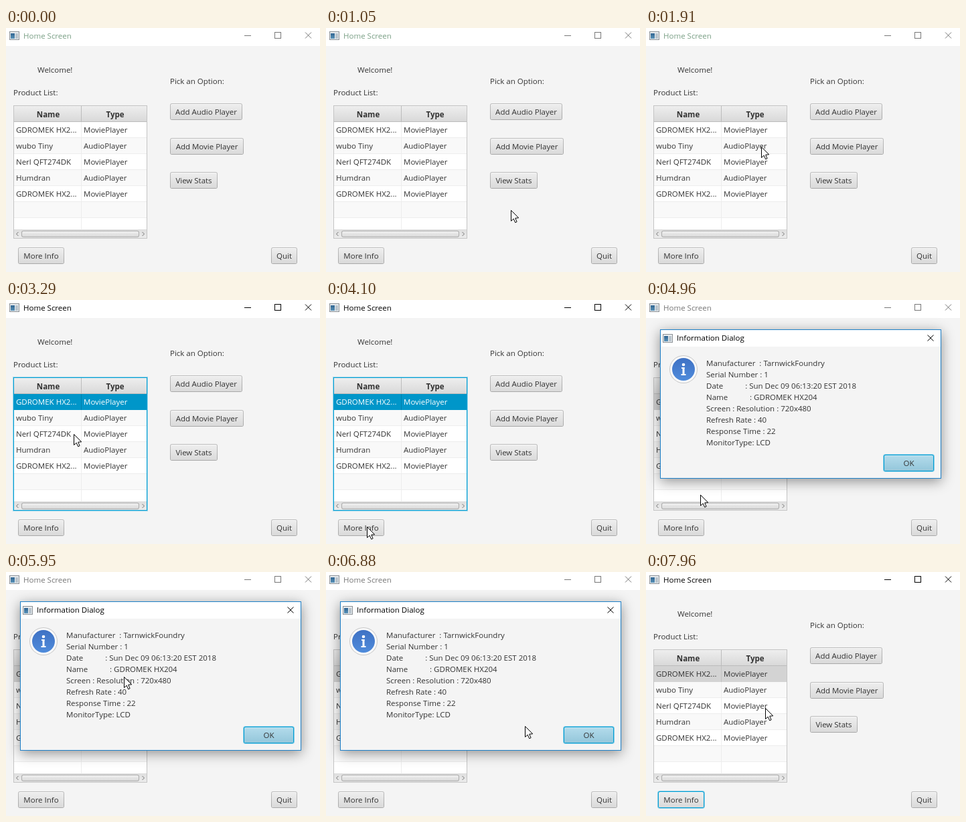
These frames come from a looping animation (469x366 px, 8 s). An HTML page with a canvas:

```html
<!DOCTYPE html>
<html lang="en">
<head>
<meta charset="utf-8">
<title>Home Screen</title>
<style>
html, body { margin: 0; width: 100%; height: 100%; overflow: hidden; background: #f4f4f4; }
canvas { display: block; width: 469px; height: 366px; }
</style>
</head>
<body>
<canvas id="stage" width="469" height="366"></canvas>
<script>
const W = 469, H = 366, LOOP = 8000;
const FAMILY = '"Open Sans", "Noto Sans", sans-serif';
const INK = '#333';
const ACCENT = '#039ed3';

// Moments at which the window state changes, in ms
const ACTIVATE = 2330, SELECT = 2410, PRESS = 4190, OPEN = 4305, CLOSE = 7200;
const FADE = 200;

const ROWS = [
  ['GDROMEK HX2...', 'MoviePlayer'],
  ['wubo Tiny', 'AudioPlayer'],
  ['Nerl QFT274DK', 'MoviePlayer'],
  ['Humdran', 'AudioPlayer'],
  ['GDROMEK HX2...', 'MoviePlayer']
];

const INFO = [
  'Manufacturer  : TarnwickFoundry',
  'Serial Number : 1',
  'Date           : Sun Dec 09 06:13:20 EST 2018',
  'Name           : GDROMEK HX204',
  'Screen : Resolution : 720x480',
  'Refresh Rate : 40',
  'Response Time : 22',
  'MonitorType: LCD'
];

// Pointer path: time, x, y
const PATH = [
  [440, 369, 362], [840, 318, 300], [1240, 241, 250], [1600, 205, 207],
  [1910, 172, 178], [2050, 145, 170], [2150, 124, 153], [2810, 124, 153],
  [3290, 101, 201], [3570, 88, 244], [3680, 85, 258], [4120, 61, 340],
  [4740, 61, 340], [4960, 81, 292], [5430, 172, 137], [5570, 172, 137],
  [5710, 172, 152], [5850, 173, 153], [6650, 256, 225], [6880, 297, 231],
  [7130, 366, 244], [7260, 366, 244], [7490, 301, 239], [7960, 178, 204]
];

const ctx = document.getElementById('stage').getContext('2d');

function text(g, str, x, y, color = INK, weight = 400, align = 'left') {
  g.font = `${weight} 11.5px ${FAMILY}`;
  g.textAlign = align;
  g.fillStyle = color;
  g.fillText(str, x, y);
}

function rect(g, x, y, w, h, fill) {
  g.fillStyle = fill;
  g.fillRect(x, y, w, h);
}

function frame(g, x, y, w, h, color) {
  g.strokeStyle = color;
  g.lineWidth = 1;
  g.strokeRect(x + 0.5, y + 0.5, w - 1, h - 1);
}

function shade(g, y, h, top, bottom) {
  const fill = g.createLinearGradient(0, y, 0, y + h);
  fill.addColorStop(0, top);
  fill.addColorStop(1, bottom);
  return fill;
}

function roundRect(g, x, y, w, h, r, fill) {
  g.beginPath();
  g.roundRect(x, y, w, h, r);
  g.fillStyle = fill;
  g.fill();
}

function lines(g, color, ...points) {
  g.beginPath();
  for (const [x1, y1, x2, y2] of points) {
    g.moveTo(x1, y1);
    g.lineTo(x2, y2);
  }
  g.strokeStyle = color;
  g.lineWidth = 1;
  g.stroke();
}

function cross(g, x, y, size, color) {
  lines(g, color, [x, y, x + size, y + size], [x + size, y, x, y + size]);
}

function button(g, label, x, y, w, focused, isDefault) {
  const h = 25;
  if (focused) roundRect(g, x - 1, y - 1, w + 2, h + 2, 4, '#8fd0e8');
  roundRect(g, x, y, w, h, 3, focused ? ACCENT : shade(g, y, h, '#bdbdbd', '#a8a8a8'));
  roundRect(g, x + 1, y + 1, w - 2, h - 2, 2, isDefault ? '#c4e6f3' : '#f8f8f8');
  const body = isDefault ? ['#b4dcec', '#93c6da'] : ['#efefef', '#d9d9d9'];
  roundRect(g, x + 1, y + 2, w - 2, h - 3, 2, shade(g, y, h, ...body));
  text(g, label, x + w / 2, y + 17, INK, 400, 'center');
}

function appIcon(g, x, y) {
  rect(g, x, y, 15, 13, '#8a8f94');
  rect(g, x + 1, y + 1, 13, 11, '#e9edf0');
  rect(g, x + 2, y + 3, 6, 8, shade(g, y + 3, 8, '#2f6390', '#5b93b8'));
  rect(g, x + 9, y + 3, 4, 8, '#b9c4cc');
}

function titleBar(active, dull) {
  const ink = active ? '#000' : dull;
  const mark = active ? '#000' : '#777';
  rect(ctx, 0, 0, W, 27, '#fff');
  appIcon(ctx, 5, 5);
  text(ctx, 'Home Screen', 26, 16, ink);
  lines(ctx, mark, [356, 11.5, 366, 11.5]);
  frame(ctx, 401, 6, 10, 10, mark);
  cross(ctx, 447, 6.5, 9, mark);
}

function scrollBar() {
  rect(ctx, 12, 302, 198, 13, shade(ctx, 302, 13, '#dedede', '#ececec'));
  roundRect(ctx, 23, 304, 176, 10, 3, '#ababab');
  roundRect(ctx, 24, 305, 174, 8, 2, shade(ctx, 305, 8, '#f0f0f0', '#d9d9d9'));
  lines(ctx, '#777',
    [18.5, 306, 15.5, 309], [15.5, 309, 18.5, 312],
    [203.5, 306, 206.5, 309], [206.5, 309, 203.5, 312]);
}

function table(selection, focused) {
  rect(ctx, 11, 116, 200, 200, '#fff');
  rect(ctx, 12, 117, 198, 24, shade(ctx, 117, 24, '#eeeeee', '#d8d8d8'));
  rect(ctx, 12, 140, 198, 1, '#bcbcbc');
  rect(ctx, 112, 117, 1, 24, '#bcbcbc');
  text(ctx, 'Name', 63, 134, INK, 700, 'center');
  text(ctx, 'Type', 163, 134, INK, 700, 'center');

  for (let i = 0; i < 7; i++) {
    const y = 141 + i * 24;
    const picked = i === 0 && selection;
    rect(ctx, 12, y, 198, Math.min(24, 302 - y), picked || (i % 2 ? '#f9f9f9' : '#fff'));
    rect(ctx, 12, y + 23, 198, 1, picked || '#ededed');
    rect(ctx, 112, y, 1, Math.min(24, 302 - y), picked ? (focused ? '#0080ad' : '#c2c2c2') : '#ededed');
    if (!ROWS[i]) continue;
    const ink = picked && focused ? '#fff' : INK;
    text(ctx, ROWS[i][0], 15, y + 16, ink);
    text(ctx, ROWS[i][1], 116, y + 16, ink);
  }
  scrollBar();
  frame(ctx, 11, 116, 200, 200, focused ? ACCENT : '#c4c4c4');
  if (focused) frame(ctx, 10, 115, 202, 202, '#9bd6ea');
}

function infoIcon(g, x, y) {
  const disc = (r, fill) => {
    g.beginPath();
    g.arc(x, y, r, 0, Math.PI * 2);
    g.fillStyle = fill;
    g.fill();
  };
  disc(21, '#c9c9c9');
  disc(20, '#fafafa');
  disc(17, shade(g, y - 17, 34, '#3f72c4', '#4f8bdb'));
  g.beginPath();
  g.arc(x, y - 7, 2.3, 0, Math.PI * 2);
  g.fillStyle = '#fff';
  g.fill();
  rect(g, x - 3, y - 3, 4.5, 2, '#fff');
  rect(g, x - 1.5, y - 3, 3, 11, '#fff');
  rect(g, x - 3.5, y + 7, 7, 2, '#fff');
}

// The dialog is painted once so that it can fade as a whole
function paintDialog() {
  const layer = document.createElement('canvas');
  layer.width = W;
  layer.height = H;
  const g = layer.getContext('2d');
  g.shadowColor = 'rgba(0,0,0,.42)';
  g.shadowBlur = 18;
  g.shadowOffsetY = 4;
  rect(g, 21, 44, 420, 224, '#f4f4f4');
  g.shadowColor = 'transparent';
  rect(g, 22, 45, 418, 25, '#fff');
  frame(g, 21, 44, 420, 224, '#1e80c8');
  appIcon(g, 25, 51);
  text(g, 'Information Dialog', 46, 61, '#000');
  cross(g, 420.5, 52.5, 9, '#000');
  infoIcon(g, 56, 104);
  INFO.forEach((line, i) => text(g, line, 90, 99 + i * 17));
  button(g, 'OK', 355, 232, 75, true, true);
  return layer;
}

const dialog = paintDialog();

function drawDialog(t) {
  if (t < OPEN || t > CLOSE + FADE) return;
  const p = t < CLOSE ? Math.min(1, (t - OPEN) / FADE) : 1 - (t - CLOSE) / FADE;
  const show = 1 - (1 - p) ** 2;
  const scale = 0.95 + 0.05 * show;
  ctx.save();
  ctx.globalAlpha = show;
  ctx.translate(231, 156);
  ctx.scale(scale, scale);
  ctx.drawImage(dialog, -231, -156);
  ctx.restore();
}

// Monotone cubic through the path, so that rests stay at rest
function slope(i, axis) {
  const a = PATH[i - 1], b = PATH[i], c = PATH[i + 1];
  if (!a || !c) {
    const [p, q] = a ? [a, b] : [b, c];
    return (q[axis] - p[axis]) / (q[0] - p[0]);
  }
  const before = (b[axis] - a[axis]) / (b[0] - a[0]);
  const after = (c[axis] - b[axis]) / (c[0] - b[0]);
  return before * after > 0 ? 2 * before * after / (before + after) : 0;
}

function pointerAt(t) {
  let i = 0;
  while (i < PATH.length - 2 && t >= PATH[i + 1][0]) i++;
  const a = PATH[i], b = PATH[i + 1], span = b[0] - a[0];
  const u = Math.min(1, (t - a[0]) / span), v = 1 - u;
  return [1, 2].map(k => Math.round(
    a[k] * (1 + 2 * u) * v * v + b[k] * u * u * (3 - 2 * u) +
    span * u * v * (slope(i, k) * v - slope(i + 1, k) * u)));
}

function drawPointer(t) {
  if (t < PATH[0][0]) return;
  const [x, y] = pointerAt(t);
  const shape = [[0, 0], [0, 16], [3.7, 12.7], [6.2, 18.3], [8.6, 17.2], [6.2, 11.7], [11.2, 11.3]];
  ctx.beginPath();
  for (const [dx, dy] of shape) ctx.lineTo(x + 0.5 + dx, y + 0.5 + dy);
  ctx.closePath();
  ctx.fillStyle = '#fff';
  ctx.fill();
  ctx.strokeStyle = '#000';
  ctx.lineWidth = 1;
  ctx.stroke();
}

function draw(t) {
  const active = (t >= ACTIVATE && t < OPEN) || t >= CLOSE;
  const tableFocus = t >= SELECT && t < PRESS;
  const selection = t < SELECT ? null : tableFocus ? '#0096c9' : '#d3d3d3';

  rect(ctx, 0, 0, W, H, '#f4f4f4');
  titleBar(active, t < ACTIVATE ? '#7a9f85' : '#777');
  text(ctx, 'Welcome!', 47, 67);
  text(ctx, 'Product List:', 11, 101);
  text(ctx, 'Pick an Option:', 245, 84);
  table(selection, tableFocus);
  button(ctx, 'Add Audio Player', 245, 113, 108);
  button(ctx, 'Add Movie Player', 245, 165, 110);
  button(ctx, 'View Stats', 245, 216, 71);
  button(ctx, 'More Info', 18, 329, 69, active && t >= PRESS);
  button(ctx, 'Quit', 396, 329, 39);
  drawDialog(t);
  drawPointer(t);
}

const start = performance.now();

function tick() {
  draw((performance.now() - start) % LOOP);
  requestAnimationFrame(tick);
}

tick();
</script>
</body>
</html>
```
